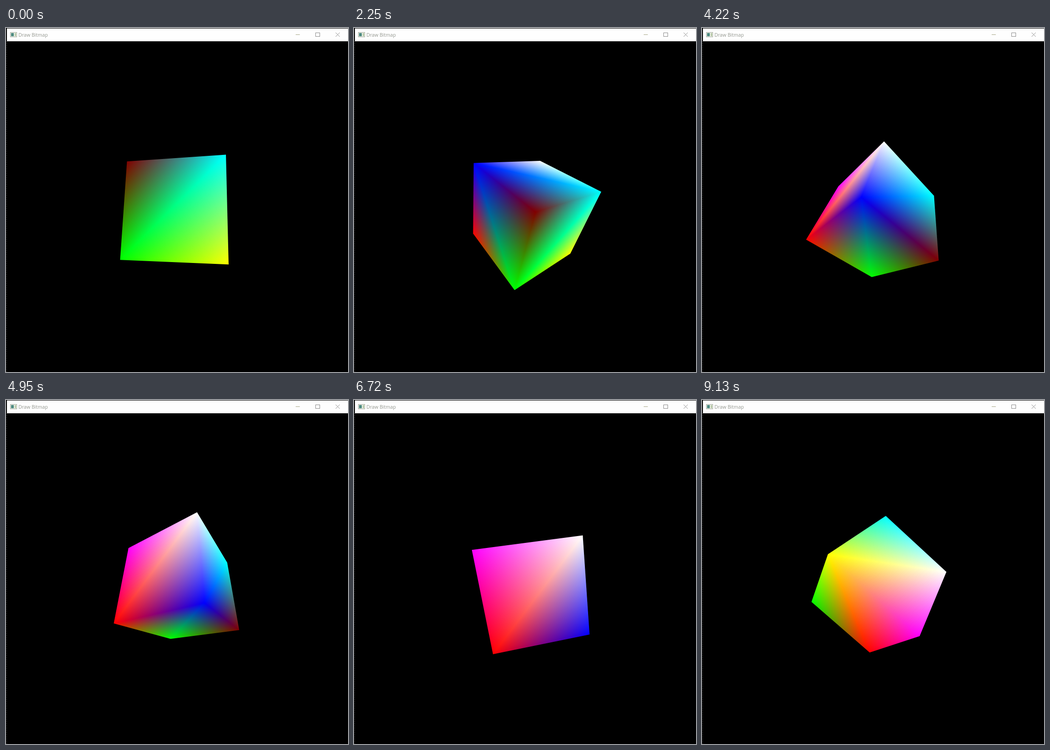
Recreate the animation shown at these times as an HTML page with a canvas. Size 745 px wide and 751 px high, loop 9.16 s.

```html
<!DOCTYPE html>
<html lang="en">
<head>
<meta charset="utf-8">
<title>Draw Bitmap</title>
<style>
  html, body { margin: 0; width: 100%; height: 100%; overflow: hidden; background: #000; }
  canvas, svg { position: absolute; left: 0; top: 0; display: block; }
  text { font: 10.6px "Open Sans", "Noto Sans", sans-serif; fill: #949890; }
</style>
</head>
<body>
<canvas id="stage" width="745" height="751"></canvas>
<svg width="745" height="751" viewBox="0 0 745 751" fill="none">
  <path d="M1.5 29V751" stroke="#3c3c3c" stroke-dasharray="2 2"/>
  <rect x="2" y="1" width="743" height="28" fill="#fefefe"/>
  <rect x="9.5" y="9.5" width="14" height="10" fill="#f2f4ee" stroke="#a3a89c"/>
  <rect x="11" y="11" width="6" height="7" fill="#4d8a80"/>
  <rect x="19" y="11" width="3" height="7" fill="#b4c8a4"/>
  <text x="27" y="19">Draw Bitmap</text>
  <path d="M631 14.5h9" stroke="#a5a585"/>
  <rect x="674.5" y="10.5" width="9" height="8" stroke="#8a8a8a"/>
  <path d="M718 10l9 9M727 10l-9 9" stroke="#8f8f8f"/>
</svg>
<script>
const ctx = document.getElementById("stage").getContext("2d");

const LOOP = 9160;
const FOCAL = 348, DISTANCE = 4, CENTER = [382, 408.7];
const AXIS = [0.652, -0.758, -0.022];

// Rotation in degrees at given times; the speed varies slightly.
const TURN = [[0, -12.7], [2250, 55.9], [4220, 113.8], [5770, 166.9],
              [6720, 192.6], [8120, 240.6], [9130, 272.4]];

// Corners: x right, y down, z away from the viewer, with their colours.
const CORNERS = {
  D: { at: [-1, -1, -1], rgb: [128, 0, 0] },
  C: { at: [ 1, -1, -1], rgb: [0, 255, 255] },
  Y: { at: [ 1,  1, -1], rgb: [255, 255, 0] },
  G: { at: [-1,  1, -1], rgb: [0, 255, 0] },
  B: { at: [-1, -1,  1], rgb: [0, 0, 255] },
  W: { at: [ 1, -1,  1], rgb: [255, 255, 255] },
  M: { at: [ 1,  1,  1], rgb: [255, 0, 255] },
  R: { at: [-1,  1,  1], rgb: [255, 0, 0] }
};

// Clockwise from outside; each face is split between its 2nd and 4th corner.
const FACES = ["DCYG", "MWBR", "CWMY", "DGRB", "WCDB", "MRGY"];

const dot = (a, b) => a[0] * b[0] + a[1] * b[1] + a[2] * b[2];
const cross = (a, b) => [
  a[1] * b[2] - a[2] * b[1],
  a[2] * b[0] - a[0] * b[2],
  a[0] * b[1] - a[1] * b[0]
];

function angleAt(time) {
  const t = Math.min(time, TURN[TURN.length - 1][0]);
  const i = Math.max(1, TURN.findIndex(knot => knot[0] >= t));
  const [t0, a0] = TURN[i - 1], [t1, a1] = TURN[i];
  return (a0 + (a1 - a0) * (t - t0) / (t1 - t0)) * Math.PI / 180;
}

function rotate(v, angle) {
  const c = Math.cos(angle), s = Math.sin(angle);
  const side = cross(AXIS, v), along = dot(AXIS, v) * (1 - c);
  return v.map((value, i) => value * c + side[i] * s + AXIS[i] * along);
}

function project([x, y, z]) {
  const scale = FOCAL / (DISTANCE + z);
  return [CENTER[0] + x * scale, CENTER[1] + y * scale];
}

// Adds one corner's share of colour, fading to black at the opposite edge.
function addCorner(a, b, c) {
  const ex = c.p[0] - b.p[0], ey = c.p[1] - b.p[1];
  const k = ((a.p[0] - b.p[0]) * ex + (a.p[1] - b.p[1]) * ey) / (ex * ex + ey * ey);
  const fade = ctx.createLinearGradient(...a.p, b.p[0] + k * ex, b.p[1] + k * ey);
  fade.addColorStop(0, `rgb(${a.rgb})`);
  fade.addColorStop(1, "#000");
  ctx.fillStyle = fade;
  ctx.fill();
}

function drawTriangle(a, b, c) {
  const area = (b.p[0] - a.p[0]) * (c.p[1] - a.p[1]) - (b.p[1] - a.p[1]) * (c.p[0] - a.p[0]);
  if (area <= 0.5) return;
  ctx.beginPath();
  for (const corner of [a, b, c]) ctx.lineTo(...corner.p);
  ctx.closePath();
  addCorner(a, b, c);
  addCorner(b, c, a);
  addCorner(c, a, b);
}

function draw(time) {
  ctx.globalCompositeOperation = "source-over";
  ctx.fillStyle = "#000";
  ctx.fillRect(0, 0, 745, 751);
  ctx.globalCompositeOperation = "lighter";

  const angle = angleAt(time);
  for (const corner of Object.values(CORNERS)) corner.p = project(rotate(corner.at, angle));
  for (const face of FACES) {
    const [a, b, c, d] = [...face].map(name => CORNERS[name]);
    drawTriangle(a, b, d);
    drawTriangle(c, d, b);
  }
}

const start = performance.now();
function tick() {
  draw((performance.now() - start) % LOOP);
  requestAnimationFrame(tick);
}
tick();
</script>
</body>
</html>
```
